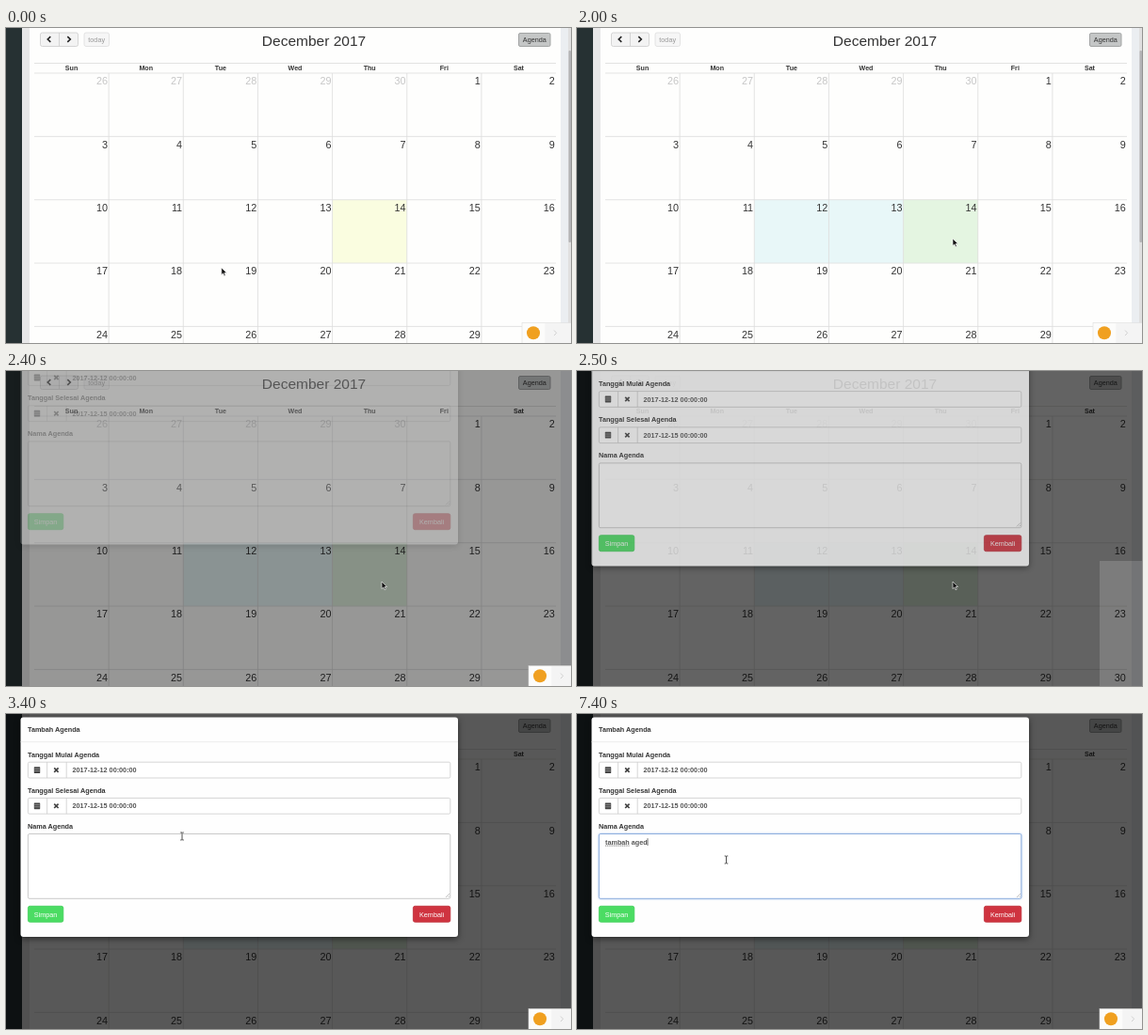
An HTML page that plays this animation: 600x335 px, repeating every 8 s.

```html
<!DOCTYPE html>
<html lang="id">
<head>
<meta charset="utf-8">
<title>Agenda</title>
<style>
html, body { margin: 0; width: 100%; height: 100%; overflow: hidden; }
svg { display: block; width: 600px; height: 335px; font: 7.26px "Liberation Sans", Arial, sans-serif; fill: #333; }
text { white-space: pre; }
.b { font-weight: bold; }
.m { text-anchor: middle; }
#flash { mix-blend-mode: color-dodge; }
.focus { stroke: #86a9dc; filter: drop-shadow(0 0 1.2px #a9c5ec); }
</style>
</head>
<body>
<svg id="stage" viewBox="0 0 600 335"></svg>
<script>
const colWidth = 79.15, rowHeight = 67.35;
const colX = i => 30 + i * colWidth;
const rowY = i => 48 + i * rowHeight;

const rect = (x, y, w, h, fill, more = '') =>
  `<rect x="${x}" y="${y}" width="${w}" height="${h}" fill="${fill}" ${more}/>`;
const text = (x, y, s, more = '') => `<text x="${x}" y="${y}" ${more}>${s}</text>`;
const path = (d, stroke, width = 1, more = '') =>
  `<path d="${d}" fill="none" stroke="${stroke}" stroke-width="${width}" ${more}/>`;
const cell = (c, fill, more = '') => rect(colX(c), rowY(2), colWidth, rowHeight, fill, more);

function calendar() {
  let s = rect(0, 0, 600, 335, '#fefefd') + rect(0, 0, 17, 335, '#263133') +
    rect(17, 0, 8, 335, '#e8e8e9') + rect(589, 0, 11, 335, '#ebeef1') +
    `<g id="scroll">${rect(597, 0, 3, 335, '#e0e0e0')}${rect(597.5, 24, 2.5, 204, '#b3b3b5', 'rx="1"')}</g>`;

  s += rect(36.5, 5, 40, 14.5, '#f3f3f3', 'rx="2" stroke="#ccc" stroke-width=".8"') +
    path('M56.5 5V19.5', '#ccc', .8) +
    path('M47.3 9.2L44.3 12L47.3 14.8M65.3 9.2L68.3 12L65.3 14.8', '#222', 1.6) +
    rect(83, 5, 26.5, 14.5, '#f6f6f6', 'rx="2" stroke="#ddd" stroke-width=".8"') +
    text(96.2, 15, 'today', 'class="m" fill="#999"') +
    text(327, 19, 'December 2017', 'class="m" font-size="15.5"') +
    rect(544.5, 5.5, 33.5, 14, '#c4c6c6', 'rx="1.5" stroke="#a2a4a4"') +
    text(561.3, 15.2, 'Agenda', 'class="m"');

  s += cell(4, '#fafde0');
  for (let i = 0; i < 3; i++) s += cell(i + 2, i == 2 ? '#e4f5e1' : '#e8f7f8', `id="pick${i}"`);

  let lines = 'M30 37.5H584';
  for (let r = 0; r < 5; r++) lines += `M30 ${rowY(r)}H584`;
  for (let c = 1; c < 7; c++) lines += `M${colX(c)} 48V335`;
  s += path(lines, '#dcdcdc', .8);

  'Sun Mon Tue Wed Thu Fri Sat'.split(' ').forEach((day, c) => {
    s += text(colX(c + .5), 45.1, day, 'class="b m" font-size="7.1"');
    for (let r = 0; r < 5; r++) {
      const n = r * 7 + c - 4;
      s += text(colX(c + 1) - 1.2, rowY(r) + 12.4, n < 1 ? n + 30 : n,
        `text-anchor="end" font-size="10.8" fill="${n < 1 ? '#c6c6c6' : '#333'}"`);
    }
  });
  return s;
}

const dateField = (y, label, value) =>
  text(23, y - 5.5, label, 'class="b"') +
  rect(23.4, y, 448.4, 16.8, '#fff', 'rx="1.5" stroke="#ccc" stroke-width=".8"') +
  path(`M43.6 ${y}v16.8M64.2 ${y}v16.8`, '#ccc', .8) +
  rect(29.8, y + 5, 6.4, 6.8, '#444', 'rx=".6"') +
  path(`M30.2 ${y + 7.2}h5.6M30.2 ${y + 9.4}h5.6`, '#fff', .4) +
  path(`M51.2 ${y + 6.2}l4.4 4.4m0 -4.4l-4.4 4.4`, '#444', 1.7) +
  text(70.5, y + 11, value, 'class="b" fill="#555"');

const button = (x, w, label, fill, edge) =>
  rect(x, 204.3, w, 17, fill, `rx="2" stroke="${edge}" stroke-width=".8"`) +
  text(x + w / 2, 215.5, label, 'class="m" fill="#fff"');

const modal = () =>
  rect(15.5, 3.5, 464.5, 233.5, '#fefefe', 'rx="3" style="filter:drop-shadow(0 2px 3px #0008)"') +
  text(23, 19.3, 'Tambah Agenda', 'class="b"') +
  path('M15.5 29.7H480', '#e8e8e8', .8) +
  dateField(51.2, 'Tanggal Mulai Agenda', '2017-12-12 00:00:00') +
  dateField(89.4, 'Tanggal Selesai Agenda', '2017-12-15 00:00:00') +
  text(23, 122, 'Nama Agenda', 'class="b"') +
  rect(23.4, 127.5, 448.4, 68.8, '#fff', 'id="area" rx="1.5" stroke="#c4c4c4" stroke-width=".9"') +
  path('M467 195l4 -4M469.5 195l1.5 -1.5', '#999', .6) +
  text(30, 138.5, '', 'id="typed" class="b" fill="#555"') +
  path('M30 140.1H55.8', '#777', .9, 'id="spell" stroke-dasharray="1.2 .6"') +
  path('M0 132.2V140', '#333', .7, 'id="caret"') +
  button(23.4, 37.4, 'Simpan', '#4bdc63', '#3fcf58') +
  button(432.4, 39.4, 'Kembali', '#cf3440', '#bd2c38');

const widget = rect(548, 313.6, 60, 24, '#fcfcfb', 'stroke="#ddd" stroke-width=".6"') +
  rect(572.3, 314, 36, 24, '#f4f4f4') +
  '<circle cx="560" cy="324.3" r="7" fill="#f0a020"/>' +
  path('M582 321.5l2.6 2.8l-2.6 2.8', '#ccc', .9);

const arrow = '<path id="arrow" d="M0 0V7.6L1.8 6L3 8.8L4.3 8.2L3.1 5.5H5.6Z" fill="#111" stroke="#fff" stroke-width=".6"/>';
const beamShape = 'M-1.8 -4H-.4L0 -3.6L.4 -4H1.8M0 -3.6V3.6M-1.8 4H-.4L0 3.6L.4 4H1.8';
const beam = `<g id="beam">${path(beamShape, '#fff', 1.6)}${path(beamShape, '#222', .8)}</g>`;

const $ = id => document.getElementById(id);
$('stage').innerHTML = calendar() + rect(0, 0, 600, 335, '#000', 'id="shade"') +
  rect(555, 202, 45, 133, '#333', 'id="flash"') +
  `<g id="modal">${modal()}</g><g id="widget">${widget}</g>` + arrow + beam;

const set = (id, name, value) => $(id).setAttribute(name, value);
const show = (id, on) => set(id, 'visibility', on ? 'visible' : 'hidden');
const ramp = (t, start, end) => Math.min(1, Math.max(0, (t - start) / (end - start)));

// Pointer glides, each from the place where the one before ended.
const glides = [
  { start: 400, end: 700, x: 215.5, y: 214.6 },
  { start: 1100, end: 1600, x: 375, y: 241 },
  { start: 1700, end: 2000, x: 399, y: 224 },
  { start: 3100, end: 3400, x: 187, y: 130 },
  { start: 3400, end: 4000, x: 140, y: 148 },
  { start: 4500, end: 4700, x: 158.5, y: 155 }
];

function pointer(t) {
  let x = 228.8, y = 254.9;
  for (const g of glides) {
    const p = ramp(t, g.start, g.end);
    x += (g.x - x) * p;
    y += (g.y - y) * p;
  }
  return [x, y];
}

const typeOut = (word, t, start, pace) =>
  word.slice(0, Math.max(0, Math.floor((t - start) / pace) + 1));

function draw(t) {
  const [x, y] = pointer(t);
  const overText = t > 3200 && y > 126;
  for (const id of ['arrow', 'beam']) {
    set(id, 'transform', `translate(${x} ${y})`);
    show(id, (id == 'beam') == overText);
  }

  const dragX = pointer(Math.min(t, 2000))[0];
  for (let i = 0; i < 3; i++) show('pick' + i, t >= 1200 && dragX > colX(i + 2));

  set('shade', 'opacity', .65 * ramp(t, 2200, 2520));
  set('modal', 'opacity', ramp(t, 2350, 2550));
  set('modal', 'transform', `translate(0 ${-58 * (1 - ramp(t, 2380, 2800)) ** 2})`);

  const dimmed = t >= 2300, flash = t >= 2500 && t < 2600;
  show('flash', flash);
  show('widget', !flash);
  set('widget', 'transform', `translate(${dimmed ? 7 : 0} 0)`);
  show('scroll', !dimmed);

  $('area').classList.toggle('focus', t >= 4100);
  $('typed').textContent = typeOut('tambah ', t, 4690, 215) + typeOut('aged', t, 6500, 300);
  set('caret', 'transform', `translate(${30.3 + $('typed').getComputedTextLength()} 0)`);
  show('caret', t >= 4000);
  show('spell', t >= 6100);
}

function tick() {
  draw(Math.floor(performance.now() % 8000 / 100) * 100);
  requestAnimationFrame(tick);
}
tick();
</script>
</body>
</html>
```
